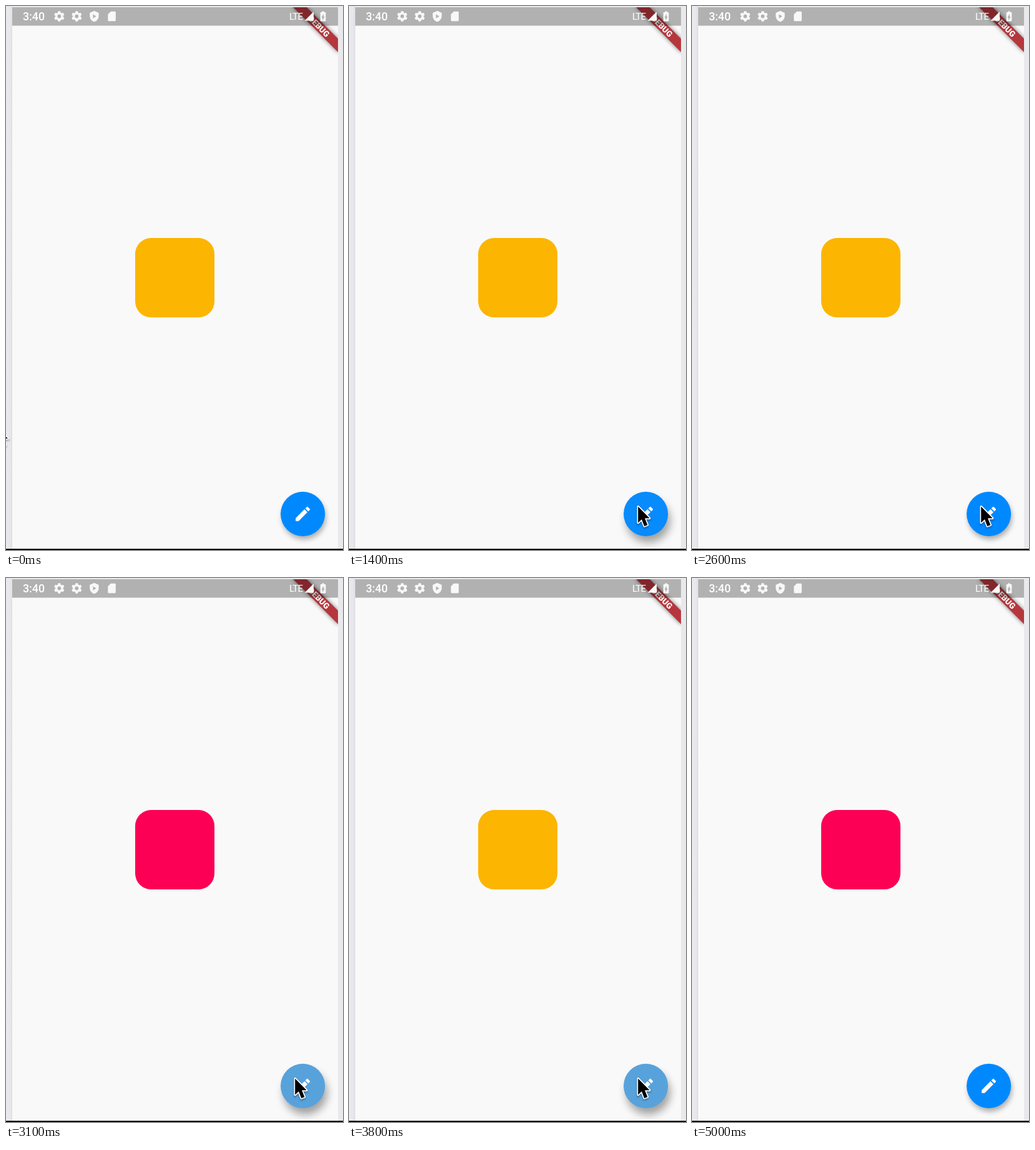
An HTML page that plays this animation: 540 by 870 pixels, repeating every 5.5 s.

```html
<!DOCTYPE html>
<html lang="en">
<head>
<meta charset="utf-8">
<title>Colour toggle</title>
<style>
html, body { margin: 0; width: 100%; height: 100%; overflow: hidden; background: #e8e8eb; }
svg { display: block; width: 540px; height: 870px; }
text { font-family: Roboto, sans-serif; fill: #fff; }
</style>
</head>
<body>
<svg viewBox="0 0 540 870">
  <defs>
    <linearGradient id="side">
      <stop offset="0" stop-color="#ebebef"/>
      <stop offset=".7" stop-color="#e7e7eb"/>
      <stop offset="1" stop-color="#dedee2"/>
    </linearGradient>
    <clipPath id="screen"><path d="M10 2H532V868H10z"/></clipPath>
    <filter id="soft" x="-50%" y="-200%" width="200%" height="500%"><feGaussianBlur stdDeviation="3.5"/></filter>
    <filter id="blur" x="-60%" y="-60%" width="220%" height="220%"><feGaussianBlur id="spread" stdDeviation="4"/></filter>
    <filter id="faint" x="-60%" y="-60%" width="220%" height="220%"><feGaussianBlur stdDeviation="1.5"/></filter>
    <g id="gear">
      <circle r="4.6" fill="none" stroke="#f8f8f8" stroke-width="3.4"/>
      <g id="teeth"></g>
    </g>
    <path id="arrow" d="M0 0V26L5.8 20.6L10 31.5L15.2 29.4L10.8 18.8H18.5z"/>
  </defs>

  <rect width="540" height="870" fill="#e9e9ec"/>
  <rect width="10" height="870" fill="url(#side)"/>
  <rect x="10" y="2" width="522" height="866" fill="#f9f9f9"/>

  <g clip-path="url(#screen)">
    <g transform="translate(532 2) rotate(45)">
      <rect x="-51" y="35.5" width="102" height="15.3" opacity=".5" filter="url(#soft)"/>
      <rect x="-51" y="35.5" width="102" height="15.3" fill="#b5373d"/>
      <text y="47.7" font-size="13" font-weight="900" text-anchor="middle">DEBUG</text>
    </g>
    <rect x="10" y="2" width="522" height="29.5" opacity=".29"/>
  </g>

  <g fill="#f8f8f8">
    <text x="27" y="23" font-size="17.8" font-weight="500">3:40</text>
    <use href="#gear" x="85.3" y="16.5"/>
    <use href="#gear" x="113.3" y="16.5"/>
    <path transform="translate(131.8 6.9) scale(.8)" fill-rule="evenodd"
      d="M12 1L3 5v6c0 5.5 3.8 10.7 9 12c5.2-1.3 9-6.5 9-12V5zM9.5 8v8l6.5-4z"/>
    <path transform="translate(160.2 7.1) scale(.78)"
      d="M18 2h-8L4 8v12c0 1.100.9 2 2 2h12c1.100 0 2-.9 2-2V4c0-1.100-.9-2-2-2z"/>
    <text x="454" y="21.500" font-size="15" letter-spacing="-.8">LTE</text>
    <path d="M478.500 23.500L493 9V23.500z"/>
    <path transform="translate(497.600 6.900) scale(.87 .8)" fill-rule="evenodd"
      d="M15.700 4H14V2h-4v2H8.300Q7 4 7 5.300V20.700Q7 22 8.300 22h7.400Q17 22 17 20.700V5.300Q17 4 15.700 4zM11 20v-5.500H9L13 7v5.500h2z"/>
  </g>

  <rect id="box" x="207" y="371" width="127" height="127" rx="25.4"/>

  <g clip-path="url(#screen)">
    <circle id="shade" r="35" filter="url(#blur)"/>
  </g>
  <circle id="fab" cx="475.6" cy="812.3" r="35.6"/>
  <path transform="translate(460.4 797) scale(1.27)" fill="#fff"
    d="M3 17.250V21h3.750L17.810 9.940l-3.750-3.750zM20.710 7.040c.39-.39.39-1.020 0-1.410l-2.340-2.340c-.39-.39-1.020-.39-1.410 0l-1.830 1.830l3.750 3.750z"/>
  <rect y="868" width="540" height="2"/>

  <g id="cursor">
    <use href="#arrow" y="2" opacity=".35" stroke="#000" stroke-width="3" filter="url(#faint)"/>
    <use href="#arrow" stroke="#fff" stroke-width="3.4" stroke-linejoin="round"/>
    <use href="#arrow"/>
  </g>
</svg>
<script>
const LOOP = 5500, STEP = 100;
const TAPS = [1300, 2000, 2900, 3600, 4300];
const BLUE = [0, 137, 255], PRESSED = [88, 162, 220];
const $ = id => document.getElementById(id);
const clamp = v => Math.max(0, Math.min(1, v));
const mix = (a, b, k) => a + (b - a) * k;
const smooth = k => k * k * (3 - 2 * k);
const set = (el, attrs) => Object.entries(attrs).forEach(([k, v]) => el.setAttribute(k, v));

$("teeth").innerHTML = [0, 60, 120, 180, 240, 300].map(a =>
  `<path transform="rotate(${a})" d="M-2.6 -5L-1.8 -8.3H1.8L2.6 -5z" fill="#f8f8f8"/>`).join("");

// Cursor legs: start, end, from, to
const LEGS = [
  [0, 400, [-15.5, 673], [216, 687]],
  [500, 1100, [216, 687], [463.2, 800.5]],
  [4600, 4900, [463.2, 800.5], [183, 715]]
];

function cursorAt(t) {
  const [t0, t1, from, to] = LEGS.filter(l => l[0] <= t).pop();
  const k = smooth(clamp((t - t0) / (t1 - t0)));
  return from.map((v, i) => mix(v, to[i], k));
}

// Ink tint and raised shadow at d ms after a tap
const tint = d => Math.min(clamp((d - 90) / 110), clamp((600 - d) / 350));
const lift = d => Math.min(clamp((d + 60) / 120), clamp((550 - d) / 200));
const peak = (fn, t) => Math.max(...TAPS.map(tap => fn(t - tap)));

function draw(time) {
  const t = Math.floor(time % LOOP / STEP) * STEP;
  const flips = TAPS.filter(tap => t - tap >= 150).length;
  const ink = peak(tint, t), up = peak(lift, t);
  const rgb = BLUE.map((v, i) => Math.round(mix(v, PRESSED[i], ink)));
  $("box").setAttribute("fill", flips % 2 ? "#fc0055" : "#fcb500");
  $("fab").setAttribute("fill", `rgb(${rgb})`);
  set($("shade"), { cx: mix(477.5, 479.5, up), cy: mix(818, 823, up), opacity: mix(.32, .36, up) });
  $("spread").setAttribute("stdDeviation", mix(4, 7, up));
  set($("cursor"), {
    transform: `translate(${cursorAt(t)})`,
    visibility: t < 5000 ? "visible" : "hidden"
  });
}

const start = performance.now();
function tick() {
  draw(performance.now() - start);
  requestAnimationFrame(tick);
}
tick();
</script>
</body>
</html>
```
